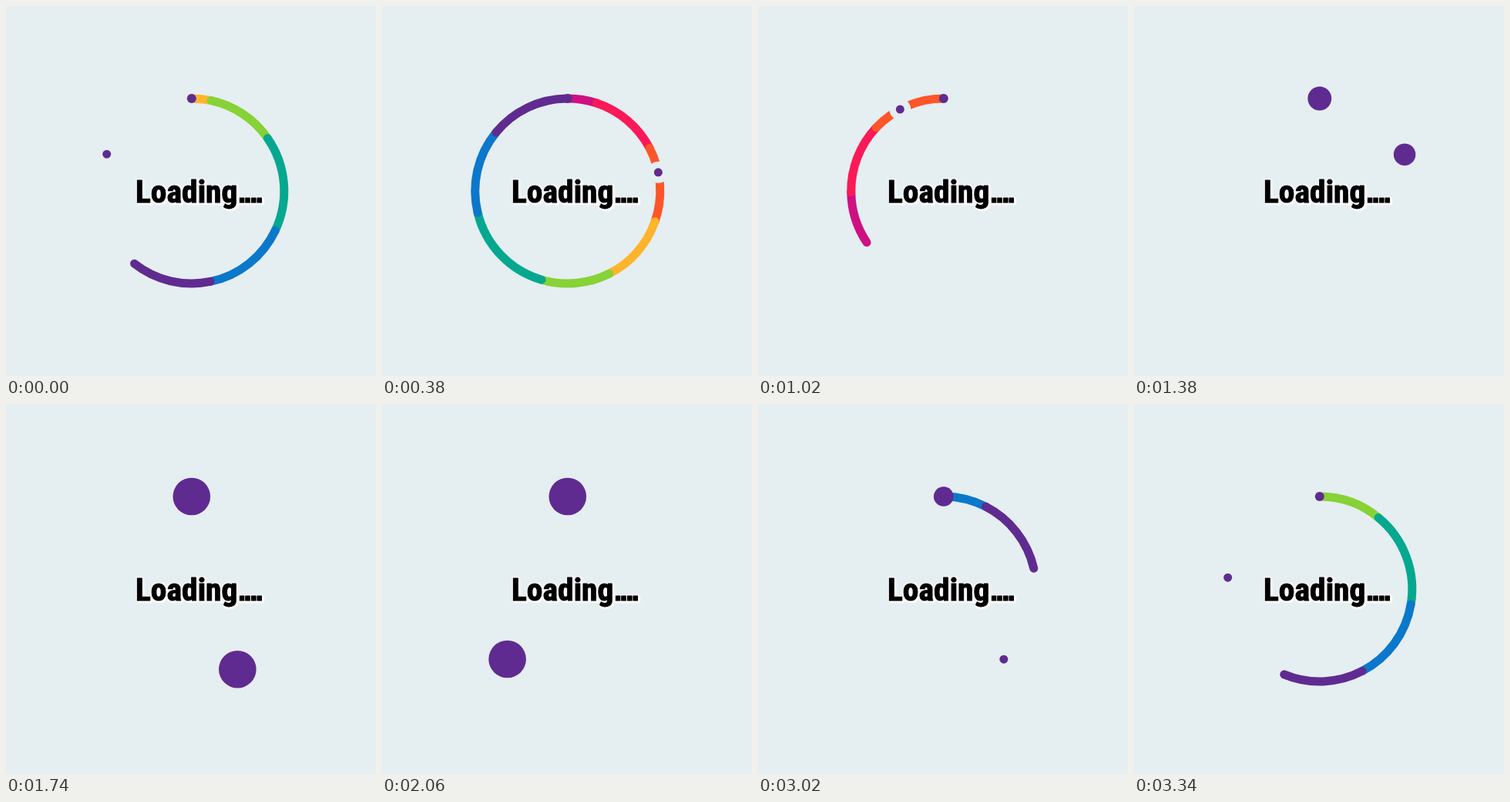
Animation, 480 px wide and 480 px high, one loop 3380 ms. Source, as an HTML page with a canvas:

```html
<!DOCTYPE html>
<html lang="en">
<head>
<meta charset="utf-8">
<title>Loading</title>
<style>
  html, body { margin: 0; width: 100%; height: 100%; overflow: hidden; background: #e5eef1; }
  canvas { display: block; }
</style>
</head>
<body>
<canvas id="stage" width="480" height="480"></canvas>
<script>
const ctx = document.getElementById('stage').getContext('2d');
const LOOP = 3380, STEPS = 84;
const CX = 240.8, CY = 240, RADIUS = 120;
const BG = '#e5eef1', PURPLE = '#602b90';
const LAUNCH = 70;   // step at which the ribbon leaves the top dot
const SLOW = 41;     // steps after launch when the dots start to swell
const SPEED = 15.68; // ribbon, degrees per step

// Ribbon pieces from head to tail: colour and length in degrees
const ribbon = [
  [PURPLE, 50], ['#0b78cb', 53], ['#05a88f', 60], ['#87d236', 43],
  ['#feb52b', 44], ['#fe5529', 47], ['#fa1a57', 44], ['#cf1080', 33]
];

// Angles run clockwise from the top
const radians = deg => (deg - 90) * Math.PI / 180;
const clamp = x => Math.min(1, Math.max(0, x));

const headAngle = u => SPEED * u - 1.3;

// Fast: runs ahead of the ribbon with a growing lead. Slow: gently braking.
function orbitAngle(u) {
  if (u < SLOW) return headAngle(u) + 86 - 71 / (1 + 0.4 * u);
  const v = u - SLOW;
  return 9.92 * v - 0.028 * v * v - 1.3;
}

// Shrinks after launch, swells again over 14 steps
function dotSize(u, small, shrinkSteps, swellStart) {
  const swell = u < SLOW ? 1 - u / shrinkSteps : (u - swellStart) / 14;
  return small + (24.3 - small) * clamp(swell);
}

function disc(deg, r, color) {
  const a = radians(deg);
  ctx.fillStyle = color;
  ctx.beginPath();
  ctx.arc(CX + RADIUS * Math.cos(a), CY + RADIUS * Math.sin(a), r, 0, 2 * Math.PI);
  ctx.fill();
}

// Drawn from the tail up, so each piece's cap lies over the one behind it
function drawRibbon(head) {
  ctx.lineWidth = 11;
  ctx.lineCap = 'round';
  let from = head - ribbon.reduce((sum, [, length]) => sum + length, 0);
  for (const [color, length] of [...ribbon].reverse()) {
    const a = Math.max(0, from), b = Math.min(360, from + length);
    from += length;
    if (a >= b) continue;
    ctx.strokeStyle = color;
    ctx.beginPath();
    ctx.arc(CX, CY, RADIUS, radians(a), radians(b));
    ctx.stroke();
  }
}

function drawText(text, x, font, spacing) {
  const y = 255;
  ctx.font = font;
  ctx.fontStretch = 'condensed';
  ctx.letterSpacing = spacing;
  ctx.lineJoin = 'round';
  ctx.strokeStyle = ctx.shadowColor = '#fff';
  ctx.lineWidth = 4;
  ctx.shadowBlur = 3;
  ctx.strokeText(text, x + 1, y + 1);
  ctx.shadowColor = 'transparent';
  ctx.fillStyle = ctx.strokeStyle = '#000';
  ctx.lineWidth = 1;
  ctx.fillText(text, x, y);
  ctx.strokeText(text, x, y);
}

function draw(step) {
  const u = (step - LAUNCH + STEPS) % STEPS;
  ctx.fillStyle = BG;
  ctx.fillRect(0, 0, 480, 480);
  drawRibbon(headAngle(u));
  const angle = orbitAngle(u), size = dotSize(u, 5.5, 4, 41.5);
  if (size < 10) disc(angle, 14, BG);
  disc(angle, size, PURPLE);
  disc(0, dotSize(u, 6, 8, 40.8), PURPLE);
  drawText('....', 300.5, 'bold 40px "Liberation Sans", sans-serif', '-3.5px');
  drawText('Loading', 168, '900 41.5px "Roboto Condensed", Roboto, "Open Sans", sans-serif', '0px');
}

const start = performance.now();
function tick() {
  const t = (performance.now() - start) % LOOP;
  draw(Math.max(0, Math.floor((t - 20) / 40)));   // the first step is held 20 ms longer
  requestAnimationFrame(tick);
}
tick();
</script>
</body>
</html>
```
